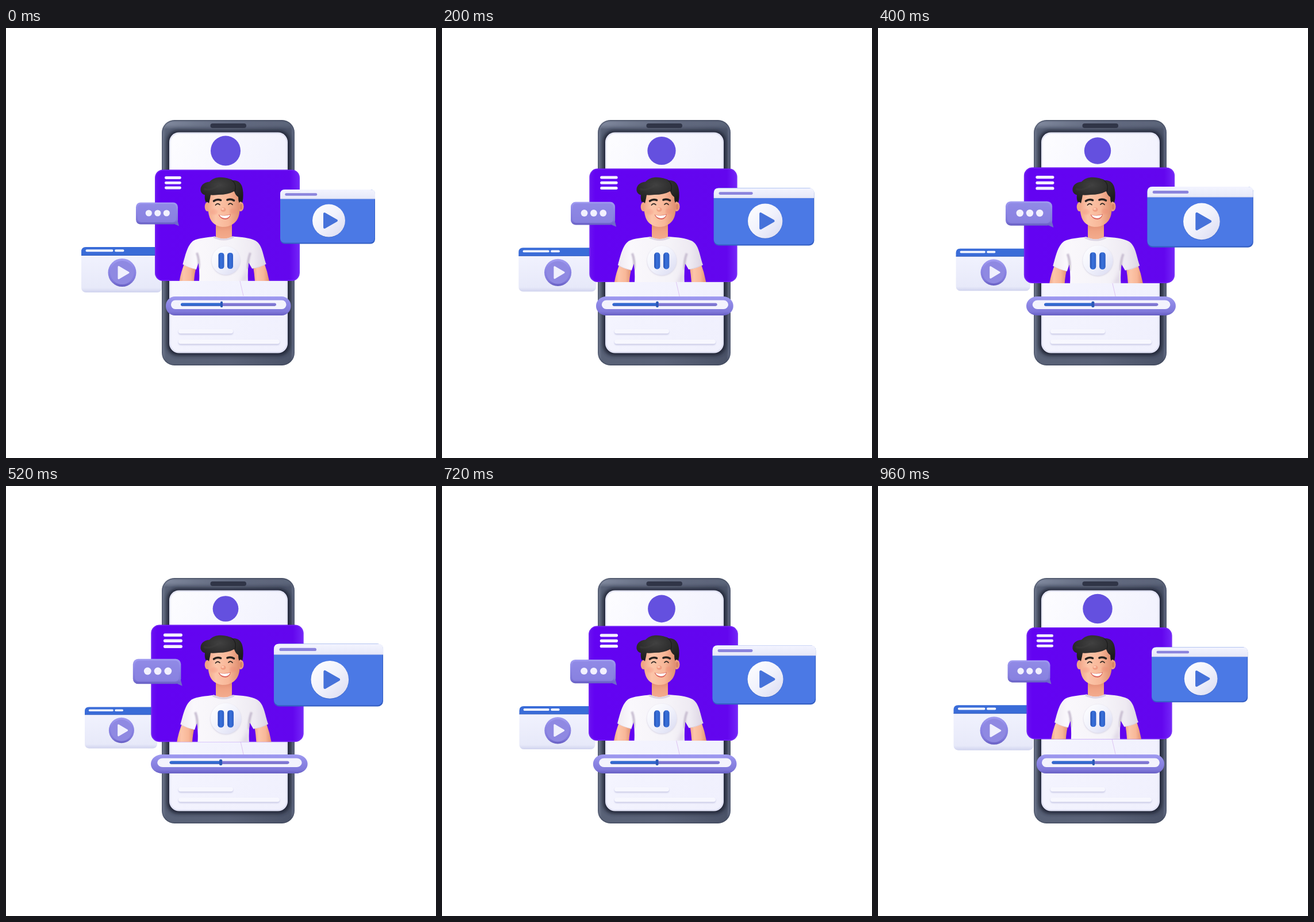
Animation, 748 px wide and 748 px high, one loop 1 s. Source, as an HTML page:

```html
<!DOCTYPE html>
<html lang="en">
<head>
<meta charset="utf-8">
<title>Video player</title>
<style>
html, body { margin: 0; width: 100%; height: 100%; overflow: hidden; background: #fff; }
svg { display: block; width: 100%; height: 100%; }
</style>
</head>
<body>
<svg viewBox="0 0 748 748">
<defs>
  <linearGradient id="frame" x1="0" y1="0" x2="1" y2="0">
    <stop offset="0" stop-color="#747d93"/><stop offset=".03" stop-color="#596277"/>
    <stop offset=".5" stop-color="#5a6278"/><stop offset=".97" stop-color="#4b5368"/>
    <stop offset="1" stop-color="#6c7590"/>
  </linearGradient>
  <linearGradient id="sheen" x1="0" y1="0" x2="1" y2="0">
    <stop offset="0" stop-color="#a3abc0" stop-opacity=".6"/><stop offset=".5" stop-color="#7d869b" stop-opacity=".25"/>
    <stop offset="1" stop-color="#8a93a8" stop-opacity=".3"/>
  </linearGradient>
  <linearGradient id="screen" x1="0" y1="0" x2="1" y2="1">
    <stop offset="0" stop-color="#fdfdff"/><stop offset=".5" stop-color="#f3f3fe"/>
    <stop offset="1" stop-color="#f0f0fd"/>
  </linearGradient>
  <linearGradient id="panel" x1="0" y1="0" x2="1" y2="0">
    <stop offset="0" stop-color="#6a12f0"/><stop offset=".04" stop-color="#6303f2"/>
    <stop offset=".93" stop-color="#6306ee"/><stop offset="1" stop-color="#7426f8"/>
  </linearGradient>
  <linearGradient id="skin" x1="0" y1="0" x2="1" y2="0">
    <stop offset="0" stop-color="#f1a78a"/><stop offset=".25" stop-color="#fcc5a9"/>
    <stop offset=".65" stop-color="#f8b798"/><stop offset="1" stop-color="#df8e70"/>
  </linearGradient>
  <linearGradient id="neck" x1="0" y1="0" x2="0" y2="1">
    <stop offset="0" stop-color="#d98163"/><stop offset=".5" stop-color="#f0a283"/>
    <stop offset="1" stop-color="#f5b092"/>
  </linearGradient>
  <linearGradient id="shirt" x1="0" y1="0" x2="1" y2="0">
    <stop offset="0" stop-color="#efeaf2"/><stop offset=".15" stop-color="#faf8fc"/>
    <stop offset=".6" stop-color="#f5f3f8"/><stop offset=".85" stop-color="#eeeaf2"/>
    <stop offset="1" stop-color="#dcd4e3"/>
  </linearGradient>
  <radialGradient id="hair" cx=".45" cy=".3" r=".7">
    <stop offset="0" stop-color="#414141"/><stop offset=".6" stop-color="#2b2b2b"/>
    <stop offset="1" stop-color="#1c1c1c"/>
  </radialGradient>
  <linearGradient id="disc" x1="0" y1="0" x2="1" y2="1">
    <stop offset="0" stop-color="#fff"/><stop offset=".5" stop-color="#f1f2fc"/>
    <stop offset="1" stop-color="#d9daf1"/>
  </linearGradient>
  <linearGradient id="violet" x1="0" y1="0" x2="0" y2="1">
    <stop offset="0" stop-color="#a19cf1"/><stop offset=".35" stop-color="#8e88e6"/>
    <stop offset=".8" stop-color="#8079da"/><stop offset="1" stop-color="#675fc3"/>
  </linearGradient>
  <linearGradient id="blue" x1="0" y1="0" x2="1" y2="0">
    <stop offset="0" stop-color="#2550b3"/><stop offset=".45" stop-color="#3971db"/>
    <stop offset="1" stop-color="#2f60c6"/>
  </linearGradient>
  <linearGradient id="paper" x1="0" y1="0" x2="0" y2="1">
    <stop offset="0" stop-color="#f3f4ff"/><stop offset=".9" stop-color="#e7e9f9"/>
    <stop offset="1" stop-color="#d0d3ee"/>
  </linearGradient>
  <filter id="soft" x="-20%" y="-20%" width="140%" height="140%"><feGaussianBlur stdDeviation="3"/></filter>
  <filter id="fine" x="-20%" y="-60%" width="140%" height="220%"><feGaussianBlur stdDeviation="1"/></filter>
  <clipPath id="shirtClip"><use href="#shirtShape"/></clipPath>
  <clipPath id="phoneClip"><rect x="271" y="160" width="231" height="427" rx="22"/></clipPath>
  <clipPath id="panelClip"><rect x="259" y="246.500" width="252" height="193.500" rx="14"/></clipPath>
</defs>

<!-- small card -->
<g data-part="small">
  <rect x="131" y="381" width="140" height="79" rx="8" fill="url(#paper)"/>
  <path d="M131 395.500V389q0-8 8-8H263q8 0 8 8v6.500z" fill="#3a6cd8"/>
  <path d="M131 395.500h140" stroke="#2d59bd"/>
  <path d="M140.500 387.300H184.500M191 387.300H203.500" stroke="#f6f7ff" stroke-width="4" stroke-linecap="round"/>
  <circle cx="202" cy="425.500" r="24.500" fill="url(#violet)"/>
  <circle cx="202" cy="425.500" r="20.500" fill="#8f89e2"/>
  <path d="M196 415.500v20l17-10z" fill="#f0f0fd" stroke="#f0f0fd" stroke-width="3" stroke-linejoin="round"/>
</g>

<!-- phone -->
<rect x="271" y="160" width="231" height="427" rx="22" fill="url(#frame)"/>
<g clip-path="url(#phoneClip)">
  <rect x="271" y="160" width="231" height="12" fill="url(#sheen)" filter="url(#soft)"/>
  <rect x="272" y="161" width="229" height="425" rx="21" fill="none" stroke="#3e465a" stroke-width="2" opacity=".5"/>
  <rect x="280" y="178" width="214" height="392" rx="19" fill="#202637" filter="url(#soft)"/>
</g>
<rect x="355.500" y="166" width="62.500" height="8" rx="4" fill="#303547"/>
<rect x="284" y="181.500" width="206" height="384" rx="17" fill="url(#screen)"/>
<rect x="285.500" y="183" width="203" height="381" rx="15.500" fill="none" stroke="#d8d9f2" stroke-width="2" opacity=".65"/>
<g id="lines"></g>

<circle data-part="badge" cx="382" cy="213.500" r="26" fill="#6450df"/>

<!-- main panel -->
<g data-part="panel">
  <path d="M407 440L413 466" stroke="#d8b9ef" stroke-width=".8"/>
  <rect x="259" y="246.500" width="252" height="193.500" rx="14" fill="url(#panel)"/>
  <rect x="260" y="247.500" width="250" height="191.500" rx="13" fill="none" stroke="#8240f7" stroke-width="1.500" opacity=".45"/>
</g>
<path d="M365 332H393V362Q393 374 379 374Q364 374 365 362Z" fill="url(#neck)"/>
<g data-part="panel"><g clip-path="url(#panelClip)">
  <path d="M311 408L331 416Q328 426 327 441H301.500Q304 425 311 408Z" fill="url(#skin)"/>
  <path d="M430 415L449 408Q455 424 458 441H433Q432 427 430 415Z" fill="url(#skin)"/>
  <path id="shirtShape" d="M363 362.500Q379 370.500 394 362.500C410 363.500 424 365 434 370C446 377 447 395 452.500 410.500Q442 417 428 418.500L422 408Q420 425 421 441H336Q337 425 335 408L331 420Q317 417 307.500 411C312 396 315 378 326 370C335 365 350 364.500 363 362.500Z" fill="url(#shirt)"/>
  <g clip-path="url(#shirtClip)">
    <path d="M335 419Q337 404 332 391M421 419Q420 404 425 391" fill="none" stroke="#c9bfd2" stroke-width="4" filter="url(#fine)"/>
    <path d="M407 441Q418 428 420 404V441Z" fill="#ded6e5" filter="url(#soft)"/>
    <path d="M307 411Q317 418 332 420.500M428 419Q442 417 453 410" fill="none" stroke="#d8cfdf" stroke-width="2"/>
    <path d="M361 363Q379 372 396 363" fill="none" stroke="#dcd5e3" stroke-width="4"/>
  </g>
</g></g>

<!-- head -->
<ellipse cx="350.500" cy="311" rx="4.800" ry="8" fill="#f0a486"/>
<ellipse cx="408" cy="310.500" rx="5.500" ry="8.500" fill="#eda083"/>
<ellipse cx="409" cy="311" rx="2.500" ry="5" fill="#d98468"/>
<path d="M351 286Q376 270 406 288L406.500 316C406 330 401 337 394 341.500Q386 346.500 376 346C364 344.500 357 338 354 329Q351 320 351 306Z" fill="url(#skin)"/>
<ellipse cx="362" cy="320" rx="6" ry="5" fill="#f59a83" opacity=".4" filter="url(#fine)"/>
<ellipse cx="395" cy="319" rx="6" ry="5" fill="#ee8c76" opacity=".4" filter="url(#fine)"/>
<path d="M338.500 283C337.500 274 344 268.500 354 267.500C361 259 375 257.500 389 262.500C392 263 393 264 394 265C407 264 412 274 412.500 286Q413 297 411 304Q408 300 405.500 304Q404 300 404 294Q399 291 397 284Q386 290 370 290Q362 291 356 290.500Q355 297 353 305Q350 301 347.500 303Q345 297 346 290.500Q340 289 338.500 283Z" fill="url(#hair)"/>
<path d="M393 265Q402 271 398 285" fill="none" stroke="#171717" stroke-width="1.500" opacity=".7"/>
<path d="M344 280Q354 284 369 275" fill="none" stroke="#4a4a4a" stroke-width="2" opacity=".5" filter="url(#fine)"/>
<g fill="none" stroke="#292320" stroke-linecap="round">
  <path d="M361.500 301Q367 297 373.500 299.500M385 299Q391 296.500 396.500 300" stroke-width="3.600"/>
  <path d="M364.500 308Q368 303.500 372 307.500M387 307Q390.500 303 394 307.300" stroke-width="1.700"/>
</g>
<ellipse cx="378" cy="316" rx="4.500" ry="3.800" fill="#f19f83"/>
<ellipse cx="377" cy="314.700" rx="2.500" ry="1.800" fill="#ffc9b0"/>
<path d="M369.500 324.500Q380 328 391 323.500Q389.500 332.500 382 333Q373 333 369.500 324.500Z" fill="#d9625c"/>
<path d="M371 325.300Q381 328 390 324.800Q388 330.500 381.500 331Q374.500 331 371 325.300Z" fill="#fff"/>

<g data-part="menu" stroke="#f4f0ff" stroke-width="4.800" stroke-linecap="round">
  <path d="M278.300 260.500H302.500M278.300 269.300H302.500M278.300 278H302.500"/>
</g>

<g data-part="pause">
  <circle cx="382.500" cy="405.500" r="25" fill="#c7c3da" opacity=".6" filter="url(#fine)"/>
  <circle cx="382.500" cy="404.500" r="24.700" fill="url(#disc)"/>
  <rect x="369.500" y="391" width="10" height="28" rx="4.500" fill="url(#blue)"/>
  <rect x="385" y="391" width="10" height="28" rx="4.500" fill="url(#blue)"/>
</g>

<!-- chat bubble -->
<g data-part="chat">
  <path d="M288 339L301 344.500L298 333Z" fill="#7069ca"/>
  <rect x="226" y="303.500" width="73" height="38" rx="8" fill="url(#violet)"/>
  <rect x="229" y="306" width="67" height="32" rx="6" fill="#8c86e3" opacity=".75"/>
  <g fill="#f2f1fe">
    <circle cx="248.300" cy="322" r="5.600"/><circle cx="263.800" cy="322" r="5.600"/><circle cx="279.300" cy="322" r="5.600"/>
  </g>
</g>

<!-- large card -->
<g data-part="large">
  <rect x="477" y="281" width="165" height="94.500" rx="8" fill="#3560c4"/>
  <rect x="477" y="281" width="164" height="92.500" rx="8" fill="#4b79e5"/>
  <path d="M477 297.500V289q0-8 8-8H634q8 0 8 8v8.500z" fill="url(#paper)"/>
  <path d="M487.500 289.500H539" stroke="#8b84dd" stroke-width="4.500" stroke-linecap="round"/>
  <circle cx="561.500" cy="335.500" r="28.700" fill="#3c66c8"/>
  <circle cx="561.500" cy="335" r="28.500" fill="url(#disc)"/>
  <path d="M554 323v24l21-12z" fill="#4672da" stroke="#4672da" stroke-width="4" stroke-linejoin="round"/>
</g>

<!-- progress bar -->
<g data-part="bar">
  <rect x="278" y="467" width="217.500" height="33" rx="16" fill="url(#violet)"/>
  <rect x="287" y="473.500" width="200.500" height="15.500" rx="7.500" fill="#f3f3fd"/>
  <rect x="304" y="478.500" width="166" height="5" rx="2.500" fill="#8178d6"/>
  <rect x="304" y="478.500" width="71" height="5" rx="2.500" fill="#316bd1"/>
  <path d="M305 483H468" stroke="#42479f" opacity=".5"/>
  <rect x="373" y="475.500" width="4" height="10.500" rx="1.800" fill="#2a58b6"/>
</g>
</svg>
<script>
const LOOP = 1000, STEP = 40, PEAK = 520;

// Pivot and full-size scale of each pulsing part
const parts = {
  small: { x: 191, y: 420, sx: 0.9, sy: 0.91 },
  badge: { x: 382, y: 213.5, sx: 0.86, sy: 0.86 },
  panel: { x: 385.2, y: 343, sx: 1.053, sy: 1.053 },
  menu:  { x: 290.4, y: 269.3, sx: 1.14, sy: 1.14 },
  pause: { x: 382.8, y: 404.5, sx: 1.08, sy: 1.08 },
  chat:  { x: 262, y: 322, sx: 1.145, sy: 1.145 },
  large: { x: 549.6, y: 323, sx: 1.152, sy: 1.152 },
  bar:   { x: 380.6, y: 483.5, sx: 1.2535, sy: 1 }
};

// Raised text placeholders on the phone screen
const pill = (y, w) => `
  <rect x="300" y="${y + 1.5}" width="${w}" height="8" rx="4" fill="#c9cae6" filter="url(#fine)"/>
  <rect x="300" y="${y}" width="${w}" height="7.500" rx="3.700" fill="#f7f7fe"/>`;
document.getElementById('lines').innerHTML = pill(524, 95) + pill(542, 176);

const nodes = [...document.querySelectorAll('[data-part]')];

function render(ms) {
  const t = Math.floor((ms % LOOP) / STEP) * STEP;
  const p = t <= PEAK ? t / PEAK : (LOOP - t) / (LOOP - PEAK);
  for (const node of nodes) {
    const { x, y, sx, sy } = parts[node.dataset.part];
    const kx = 1 + (sx - 1) * p, ky = 1 + (sy - 1) * p;
    node.setAttribute('transform', `matrix(${kx} 0 0 ${ky} ${x * (1 - kx)} ${y * (1 - ky)})`);
  }
}

const start = performance.now();
function tick() {
  render(performance.now() - start);
  requestAnimationFrame(tick);
}
tick();
</script>
</body>
</html>
```
